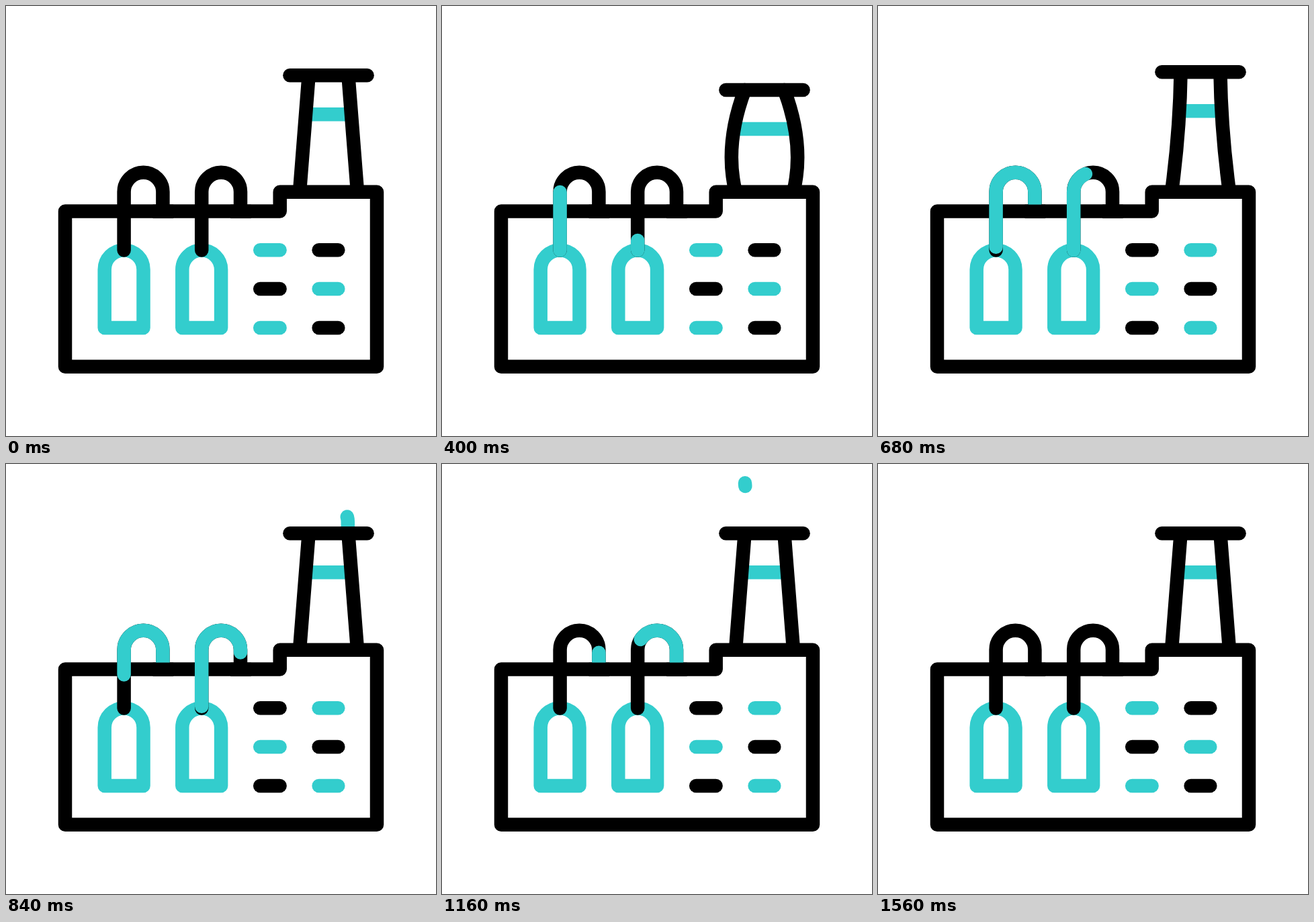
An HTML page for the animation above (1.8 s loop, 640 by 640 pixels).

```html
<!DOCTYPE html>
<html lang="en">
<head>
<meta charset="utf-8">
<title>Factory</title>
<style>
  html, body { margin: 0; width: 100%; height: 100%; overflow: hidden; background: #fff; }
  svg { display: block; width: 100vw; height: 100vh; }
  path { fill: none; stroke: #000; stroke-width: 20.5; stroke-linecap: round; stroke-linejoin: round; }
  .teal { stroke: #33cdcd; }
  .flat { stroke-linecap: butt; }
</style>
</head>
<body>
<svg viewBox="0 0 640 640">
  <path id="smoke" class="teal" d="M508.8 103.2V86.1a28.9 28.9 0 0 0-28.9-28.9a28.9 28.9 0 0 1-28.9-28.9"/>
  <path id="band" class="teal flat"/>
  <path id="legs"/>
  <path id="rim"/>
  <path d="M88 305.5H407.7V276.7H552V536.7H88Z"/>
  <g id="tanks"></g>
  <g id="windows"></g>
</svg>
<script>
const LOOP = 1800, STEP = 40;
const $ = id => document.getElementById(id);

function addPath(parent, d, cls = '') {
  const p = document.createElementNS('http://www.w3.org/2000/svg', 'path');
  p.setAttribute('d', d);
  p.setAttribute('class', cls);
  parent.appendChild(p);
  return p;
}

// Smooth progress from 0 to 1 between two times
function ease(t, from, to) {
  const u = Math.min(1, Math.max(0, (t - from) / (to - from)));
  return u * u * (3 - 2 * u);
}

function flow(path, head, tail) {
  return { path, head, tail, length: path.getTotalLength() };
}

function addTank(x, head, tail) {
  const g = $('tanks');
  const pipe = `M${x} 363.4V276.6a28.9 28.9 0 0 1 57.8 0V305.5`;
  addPath(g, `M${x + 28.9} 479H${x - 28.9}V392.3a28.9 28.9 0 0 1 57.8 0Z`, 'teal');
  addPath(g, pipe);
  const liquid = addPath(g, pipe, 'teal');
  addPath(g, `M${x + 43} 305.8h30.5`, 'flat');
  return flow(liquid, head, tail);
}

const flows = [
  addTank(175.6, [95, 780], [619, 1310]),
  addTank(291.2, [285, 995], [790, 1530]),
  flow($('smoke'), [700, 1150], [800, 1213])
];

const panes = [];
for (let row = 0; row < 3; row++) {
  for (let col = 0; col < 2; col++) {
    const x = col ? 465.6 : 378.2;
    const path = addPath($('windows'), `M${x} ${363.2 + row * 57.85}h${col ? 28.7 : 29.4}`);
    panes.push({ path, odd: (row + col) % 2 === 1 });
  }
}

function drawFlow(f, t) {
  const start = f.length * ease(t, ...f.tail);
  const size = f.length * ease(t, ...f.head) - start;
  f.path.style.display = size > 0.01 ? '' : 'none';
  f.path.setAttribute('stroke-dasharray', `${size} 9999`);
  f.path.setAttribute('stroke-dashoffset', -start);
}

// Squash, stretch, then settle
function drawChimney(t) {
  const drop = 24.4 * ease(t, 40, 360) - 34.4 * ease(t, 360, 600) + 10 * ease(t, 600, 760);
  const top = 103.2 + drop;
  const midY = (top + 276.7) / 2 + drop * 0.28;
  const bend = 36.2 + drop * 1.1;
  const leg = s => `M${480 + s * 29.4} ${top}Q${480 + s * bend} ${midY} ${480 + s * 43} 276.7`;
  const half = 34 + Math.max(0, drop) * 0.5;
  $('legs').setAttribute('d', leg(-1) + leg(1));
  $('rim').setAttribute('d', `M422.4 ${top}H537.6`);
  $('band').setAttribute('d', `M${480 - half} ${top + 58}H${480 + half}`);
}

function draw(t) {
  drawChimney(t);
  flows.forEach(f => drawFlow(f, t));
  const swapped = t >= 600 && t < 1200;
  panes.forEach(p => p.path.classList.toggle('teal', p.odd === swapped));
}

const begin = performance.now();
function tick() {
  const t = (performance.now() - begin) % LOOP;
  draw(Math.floor(t / STEP) * STEP);
  requestAnimationFrame(tick);
}
tick();
</script>
</body>
</html>
```
